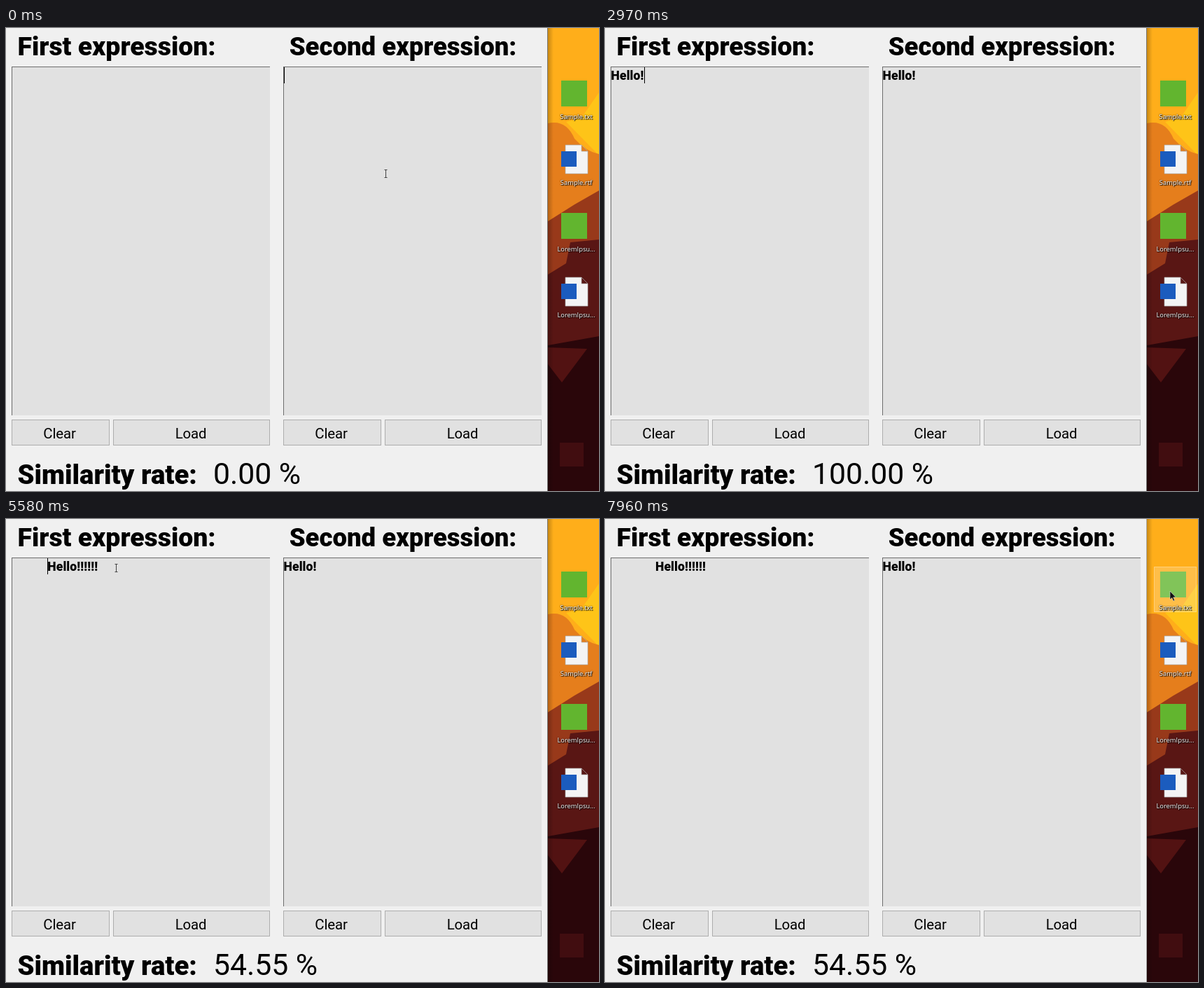
An HTML page for the animation above (8 s loop, 847 by 661 pixels).

```html
<!DOCTYPE html>
<html lang="en">
<head>
<meta charset="utf-8">
<title>Expression similarity</title>
<style>
  html, body { margin: 0; width: 100%; height: 100%; overflow: hidden; background: #f0f0f0; }
  svg { display: block; width: 847px; height: 661px; }
  text { font-family: Roboto, sans-serif; white-space: pre; }
  .title { font-weight: 800; }
  .entry { font-weight: 800; font-size: 17.5px; letter-spacing: .15px; }
  .button { font-size: 20.4px; letter-spacing: -.15px; text-anchor: middle; }
  .label { font: 9.4px "Open Sans", sans-serif; fill: #fff; text-anchor: middle;
           text-shadow: 1px 1px 1px #000, 0 0 2px #000; }
</style>
</head>
<body>
<svg viewBox="0 0 847 661">
  <defs>
    <linearGradient id="shade">
      <stop stop-opacity=".22"/>
      <stop offset="1" stop-opacity="0"/>
    </linearGradient>
    <g id="panel">
      <path d="M8 55H377V553H8z" fill="#6d6d6d"/>
      <path d="M9 56H377V553H9z" fill="#e1e1e1"/>
      <g fill="#e1e1e1" stroke="#adadad">
        <rect x="8.5" y="559.5" width="139" height="36"/>
        <rect x="153.5" y="559.5" width="223" height="36"/>
      </g>
      <text class="button" x="76.5" y="586">Clear</text>
      <text class="button" x="264" y="586">Load</text>
    </g>
    <rect id="note" x="793" y="75" width="37" height="37" fill="#62b52f"/>
    <g id="document">
      <path d="M799 167h23l9 9v32h-32zM822 167v9h9" fill="#f4f4f4" stroke="#a9a9a9" stroke-width=".7"/>
      <rect x="793" y="176" width="22" height="22" fill="#1b5cbe"/>
    </g>
  </defs>

  <rect width="847" height="661" fill="#f0f0f0"/>
  <rect x="774" width="73" height="661" fill="#ffae1a"/>
  <path d="M847 92L822 128L800 134L847 182z" fill="#fec418"/>
  <path d="M774 136Q800 130 812 158Q828 176 847 180V330H774z" fill="#e57e1c"/>
  <path d="M774 276L812 252L847 232V360H774z" fill="#98391a"/>
  <path d="M774 352L800 336L806 306L847 302V470H774z" fill="#591614"/>
  <path d="M774 453L847 440V661H774z" fill="#2a060a"/>
  <path d="M774 456L830 458L794 506L774 480z" fill="#521212"/>
  <rect x="791" y="592" width="34" height="34" fill="#410d10"/>
  <rect x="774" width="8" height="661" fill="url(#shade)"/>
  <rect id="edge" x="773" width="1" height="661"/>
  <use href="#note"/>
  <use href="#document"/>
  <use href="#note" y="189"/>
  <use href="#document" y="189"/>
  <rect id="hover" x="784.5" y="68.5" width="60" height="64" fill="#fff" fill-opacity=".2" stroke="#fff" stroke-opacity=".35"/>
  <text class="label" x="814.5" y="130">Sample.txt</text>
  <text class="label" x="814.5" y="224">Sample.rtf</text>
  <text class="label" x="814.5" y="319">LoremIpsu...</text>
  <text class="label" x="814.5" y="413">LoremIpsu...</text>

  <use href="#panel"/>
  <use href="#panel" x="388"/>
  <text class="title" x="16.5" y="39" font-size="37.4">First expression:</text>
  <text class="title" x="404.7" y="39" font-size="36.5">Second expression:</text>
  <text class="title" x="16.5" y="651" font-size="38.3">Similarity rate:</text>
  <text id="rate" x="296" y="651" font-size="42.7"></text>
  <text id="first" class="entry" y="74"></text>
  <text id="second" class="entry" x="396.5" y="74"></text>
  <rect id="caret" y="56" width="1" height="23"/>
  <path id="beam" d="M-2 -5.5H2M0 -5V5M-2 5.5H2" fill="none" stroke="#444"/>
  <path id="arrow" d="M0 0V12L2.8 9.5L4.7 14L6.6 13.2L4.7 8.8H8.4z" fill="#111" stroke="#eee" stroke-width=".5"/>
</svg>
<script>
const LOOP = 8000;
const BLINK = 530;
const SPACE = 4.23;
const WORD = "Hello!!!!!!";
const FOCUS_LOST = 7830;
const $ = id => document.getElementById(id);

// Keystroke runs and clicks; a click is a run of one.
const run = (start, every = 0, count = 1) => ({ start, every, count });
const runs = {
  focusSecond: run(-390),
  second: run(560, 110, 6),
  focusFirst: run(1750),
  hello: run(2340, 126, 6),
  bangs: run(3170, 140, 5),
  clickStart: run(4670),
  indent: run(5200, 34, 15),
  clickEnd: run(6250),
  trailing: run(6480, 34, 12)
};

// Pointer glides; after each one it rests until typing hides it.
const glide = (start, end, hide, from, to, bow = 0) => ({ start, end, hide, from, to, bow });
const glides = [
  glide(-1, 0, 560, [542, 208], [542, 208]),
  glide(1500, 1780, 2340, [438, 192], [179, 118]),
  glide(3520, 4000, 4670, [179, 118], [11, 69]),
  glide(4670, 5150, 5200, [11, 69], [50, 97]),
  glide(5220, 5780, 5920, [50, 97], [173, 66]),
  glide(5920, 6250, 6480, [173, 66], [285, 101]),
  glide(7010, FOCUS_LOST, LOOP, [285, 101], [807, 103], 139)
];

function typed({ start, every, count }, t) {
  if (t < start) return 0;
  return every ? Math.min(count, 1 + Math.floor((t - start) / every)) : 1;
}

function caretLit(t) {
  const last = Math.max(...Object.values(runs)
    .filter(r => r.start <= t)
    .map(r => r.start + (typed(r, t) - 1) * r.every));
  return t < FOCUS_LOST && (t - last) % (2 * BLINK) < BLINK;
}

function pointerAt(t) {
  const g = glides.find(g => t >= g.start && t < g.hide);
  if (!g) return null;
  const k = Math.min(1, (t - g.start) / (g.end - g.start));
  const s = 1 - (1 - k) ** 2;
  const [x, y] = g.from.map((a, i) => a + (g.to[i] - a) * s);
  return [Math.round(x), Math.round(y + g.bow * 4 * s * (1 - s))];
}

const similarity = (a, b) => a && b ? 100 * Math.min(a, b) / Math.max(a, b) : 0;
const show = (el, on) => { el.style.display = on ? "" : "none"; };
const within = (v, low, high) => v > low && v < high;

function drawText(t) {
  const first = typed(runs.hello, t) + typed(runs.bangs, t);
  const second = typed(runs.second, t);
  $("first").textContent = WORD.slice(0, first);
  $("first").setAttribute("x", 8.5 + SPACE * typed(runs.indent, t));
  $("second").textContent = WORD.slice(0, second);
  $("rate").textContent = similarity(first, second).toFixed(2) + " %";
}

function drawCaret(t) {
  const field = t < runs.focusFirst.start ? $("second") : $("first");
  const atStart = within(t, runs.clickStart.start, runs.clickEnd.start);
  const width = atStart || !field.textContent ? 0 : field.getComputedTextLength();
  const x = +field.getAttribute("x") + .5 + width + SPACE * typed(runs.trailing, t);
  $("caret").setAttribute("x", Math.floor(x));
  show($("caret"), caretLit(t));
}

function drawPointer(t) {
  const at = pointerAt(t);
  const [x, y] = at || [0, 0];
  const overText = within(y, 55, 553) && (within(x, 8, 377) || within(x, 396, 765));
  show($("beam"), at && overText);
  show($("arrow"), at && !overText);
  show($("hover"), x > 784 && y < 133);
  $("beam").setAttribute("transform", `translate(${x + .5} ${y})`);
  $("arrow").setAttribute("transform", `translate(${x} ${y})`);
}

function draw(t) {
  drawText(t);
  drawCaret(t);
  drawPointer(t);
  $("edge").setAttribute("fill", t < FOCUS_LOST ? "#777" : "#aaa");
}

const start = performance.now();
function tick() {
  draw((performance.now() - start) % LOOP);
  requestAnimationFrame(tick);
}
tick();
</script>
</body>
</html>
```
